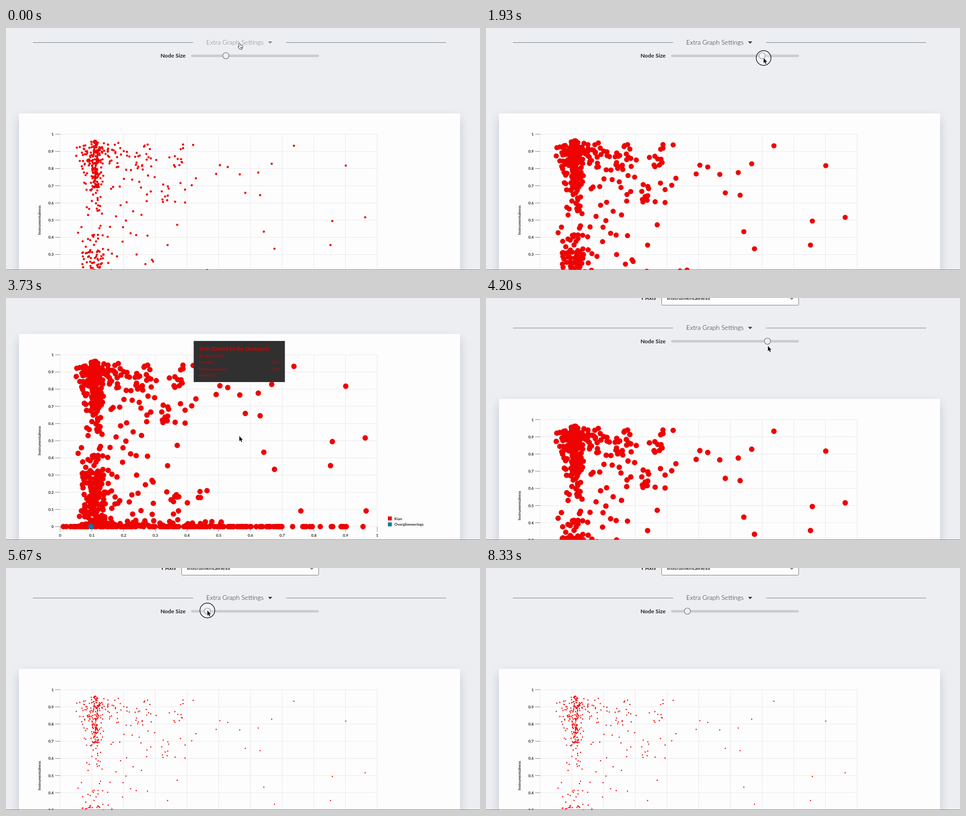
An HTML page for the animation above (8.39 s loop, 1024 px wide and 524 px high).

```html
<!DOCTYPE html>
<html lang="en">
<head>
<meta charset="utf-8">
<title>Scatter plot node size</title>
<style>
html, body { margin: 0; width: 100%; height: 100%; overflow: hidden; background: #eceef2; }
svg { display: block; width: 100vw; height: 100vh; }
text { font-family: Lato, "Open Sans", sans-serif; fill: #222; }
.small { font-size: 8.3px; font-weight: 700; }
.label { font-size: 12.2px; font-weight: 700; }
#tip text { fill: #d80000; font-size: 8.3px; }
#tip .title { font-size: 11.4px; font-weight: 700; }
</style>
</head>
<body>
<svg viewBox="0 0 1024 524" preserveAspectRatio="none">
  <defs>
    <filter id="blur" filterUnits="userSpaceOnUse" x="-40" y="120" width="1104" height="720">
      <feGaussianBlur stdDeviation="11"/>
    </filter>
  </defs>
  <g id="page">
    <text class="label" x="367" y="-29.5" text-anchor="end">Y Axis</text>
    <rect x="379.5" y="-49" width="296" height="31" rx="2" fill="#fdfdfd" stroke="#74777c"/>
    <text class="label" x="391" y="-29.5">Instrumentalness</text>
    <path d="M657 -34.5l3.5 3.5 3.5-3.5" fill="none" stroke="#444" stroke-width="1.3"/>

    <path d="M58 31.5H404.500M605 31.5H951" stroke="#6d7a86"/>
    <g id="heading">
      <text x="494.500" y="35.500" text-anchor="middle" font-size="14" font-weight="300">Extra Graph Settings</text>
      <path d="M566 29h9.500l-4.750 5z" fill="#3c3f44"/>
    </g>
    <text class="label" x="388" y="64" text-anchor="end">Node Size</text>
    <rect x="400" y="57.500" width="276" height="5.500" rx="2.750" fill="#c9ccd2"/>
    <circle id="thumb" cy="60" r="6.700" fill="#eceef2" stroke="#686c72" stroke-width="1.100"/>

    <rect x="30" y="196" width="949" height="600" fill="#6c7480" opacity=".38" filter="url(#blur)"/>
    <rect x="28" y="185" width="953" height="620" fill="#fdfdfd"/>
    <g id="axes"></g>
    <text class="small" text-anchor="middle" transform="translate(75 416) rotate(-90)">Instrumentalness</text>
    <g fill="none" stroke-linecap="round">
      <path id="nodes" stroke="#ee0202"/>
      <path id="blueNode" d="M183.500 602h.01" stroke="#0b7aa6"/>
    </g>
    <rect x="825" y="580" width="8.500" height="8.500" fill="#ee0202"/>
    <rect x="825" y="593" width="8.500" height="8.500" fill="#0b7aa6"/>
    <text class="small" x="839" y="587.500">Kian</text>
    <text class="small" x="839" y="600">Overglimmerings</text>

    <g id="tip">
      <rect id="tipBox" height="89" fill="#303030"/>
      <text id="tipTitle" class="title" x="12" y="21"></text>
      <text id="tipBy" x="12" y="34.500"></text>
      <text x="12" y="49">Liveness</text>
      <text id="tipLive" y="49" text-anchor="end"></text>
      <text x="12" y="64">Instrumentalness</text>
      <text id="tipInst" y="64" text-anchor="end"></text>
      <text x="12" y="77">From Kian</text>
    </g>
  </g>
  <g id="cursor">
    <circle id="ring" r="16" fill="#fff" fill-opacity=".25" stroke="#151515" stroke-width="1.400"/>
    <path id="arrow" d="M0 0v11l2.500-2.200 1.700 4 1.900-.8-1.700-3.900h3.300z" fill="#111" stroke="#fff" stroke-width=".8" paint-order="stroke"/>
    <path id="hand" d="M-.5 0q1.500-1 2 .6l.6 3.400 4 .6q1.600.6 1.300 2.400l-.6 3.500-1 2.500h-5l-3.600-4.800q0-1.600 1.500-1l1 .8-1.200-6.400q0-1.200 1-1.600zM3 8v3M5 8v3" fill="#fff" stroke="#222"/>
  </g>
  <path d="M0 523.500H1024" stroke="#77797c"/>
</svg>
<script>
const LOOP = 8390, STEP = 200 / 3;
const $ = id => document.getElementById(id);
const set = (el, attrs) => { for (const k in attrs) el.setAttribute(k, attrs[k]); };
const show = (el, on) => set(el, { visibility: on ? "visible" : "hidden" });
const px = live => 117 + 685 * live;
const py = inst => 602 - 372 * inst;

// Eased moves from one pose to the next; each leg is [start, end, ...pose]
function move(pose, legs, t) {
  for (const [start, end, ...next] of legs) {
    const p = Math.min(Math.max((t - start) / (end - start), 0), 1);
    const eased = 1 - (1 - p) ** 2;
    pose = pose.map((v, i) => v + (next[i] - v) * eased);
  }
  return pose;
}

function buildAxes() {
  let grid = "", ticks = "", labels = "";
  for (let i = 0; i <= 10; i++) {
    const x = px(i / 10), y = py(i / 10), name = i / 10;
    grid += `M${x} 230V602M117 ${y}H802`;
    ticks += `M106 ${y}H117M${x} 602v11`;
    labels += `<text class="small" x="103" y="${y + 3}" text-anchor="end">${name}</text>` +
      `<text class="small" x="${x}" y="624" text-anchor="middle">${name}</text>`;
  }
  $("axes").innerHTML = `<path d="${grid}" stroke="#dddde8" stroke-dasharray="2 1"/>` +
    `<path d="${ticks}" stroke="#808288"/>${labels}`;
}

// A few far nodes; all others come from seeded clouds
const outliers = [[462, 297], [479, 301], [454, 316], [505, 317], [545, 313], [574, 294], [622, 255],
  [734, 298], [517, 357], [549, 362], [557, 441], [580, 478], [705, 418], [776, 410], [701, 470],
  [637, 568], [778, 568]];

function buildNodes() {
  let seed = 41, d = "";
  const rnd = () => (seed = (seed * 16807) % 2147483647) / 2147483647;
  const bell = () => (rnd() + rnd() + rnd() - 1.5) * 2;
  const dot = (x, y) => { d += `M${x.toFixed(1)} ${y.toFixed(1)}h.01`; };
  const cloud = (n, live, inst) => {
    for (let i = 0; i < n; i++) dot(px(live()), py(inst()));
  };
  outliers.forEach(([x, y]) => dot(x, y));

  // Dense columns at low liveness
  cloud(95, () => .112 + .006 * bell(), () => .965 - .28 * rnd() ** 1.3);
  cloud(85, () => .105 + .024 * bell(), () => .93 + .02 * bell() - .13 * rnd());
  cloud(32, () => .112 + .016 * bell(), () => .8 - .13 * rnd());
  cloud(16, () => .107 + .014 * bell(), () => .66 - .14 * rnd());
  cloud(24, () => .105 + .022 * bell(), () => .47 - .17 * rnd());
  cloud(150, () => .108 + .021 * bell(), () => .32 * rnd() ** 1.6);

  // Tails thinning out to the right
  cloud(46, () => .15 + .14 * rnd() ** 1.4, () => .95 - .16 * rnd());
  cloud(14, () => .28 + .14 * rnd(), () => .94 - .14 * rnd() ** 2);
  cloud(34, () => .16 + .27 * rnd(), () => .77 - .3 * rnd());
  cloud(16, () => .14 + .24 * rnd(), () => .47 - .24 * rnd());
  cloud(36, () => .14 + .33 * rnd(), () => .21 * rnd());

  // Nodes on and just above the baseline
  cloud(55, () => .06 + .45 * rnd() ** 1.6, () => .03 * rnd() ** 1.5);
  cloud(150, () => .01 + .69 * rnd(), () => 0);
  cloud(18, () => .73 + .24 * rnd(), () => 0);
  set($("nodes"), { d });
}

const scrollLegs = [[3200, 3730, -107], [3790, 4190, 33.5]];
const thumbLegs = [[810, 2400, 608], [4470, 5660, 435]];
const cursorLegs = [[70, 600, 475, 65], [740, 2330, 608, 65], [2540, 2670, 607, 59], [2870, 3130, 504, 299],
  [3790, 4190, 609, 104], [4200, 4400, 608, 92], [4400, 5600, 435, 92],
  [6010, 6730, 505, 150], [6940, 7400, 520, 110], [8010, 8330, 560, -25]];
const songs = [
  { title: "Ember Go", by: "By Vuno", live: "62%", inst: "78%", width: 132 },
  { title: "Drift (Dozed by the Daybreak)", by: "By Amber Tolls", live: "56%", inst: "77%", width: 197 }
];

function drawTip(t) {
  const song = songs[t < 3190 ? 0 : 1];
  const [x, bottom] = move([545, 190], [[3060, 3260, 504, 289]], t);
  show($("tip"), t > 3050 && t < 3860);
  set($("tip"), { transform: `translate(${x - song.width / 2} ${bottom - 89})` });
  set($("tipBox"), { width: song.width });
  $("tipTitle").textContent = song.title;
  $("tipBy").textContent = song.by;
  $("tipLive").textContent = song.live;
  $("tipInst").textContent = song.inst;
  for (const id of ["tipLive", "tipInst"]) set($(id), { x: song.width - 12 });
}

function draw(time) {
  const t = Math.floor((time % LOOP + 4) / STEP) * STEP;
  const [scroll] = move([0], scrollLegs, t);
  set($("page"), { transform: `translate(0 ${scroll})` });
  set($("heading"), { opacity: move([.55], [[70, 400, 1]], t)[0] });

  const [thumb] = move([475], thumbLegs, t);
  const size = 1.3 + 13.6 * (thumb - 408) / 260;
  set($("thumb"), { cx: thumb });
  set($("nodes"), { "stroke-width": size });
  set($("blueNode"), { "stroke-width": size });
  drawTip(t);

  const [x, y] = move([504, 33], cursorLegs, t);
  set($("cursor"), { transform: `translate(${x} ${y})` });
  show($("ring"), (t > 730 && t < 2390) || (t > 4390 && t < 5920));
  show($("hand"), t < 400);
  show($("arrow"), t >= 400);
}

function tick() {
  draw(performance.now());
  requestAnimationFrame(tick);
}
buildAxes();
buildNodes();
tick();
</script>
</body>
</html>
```
